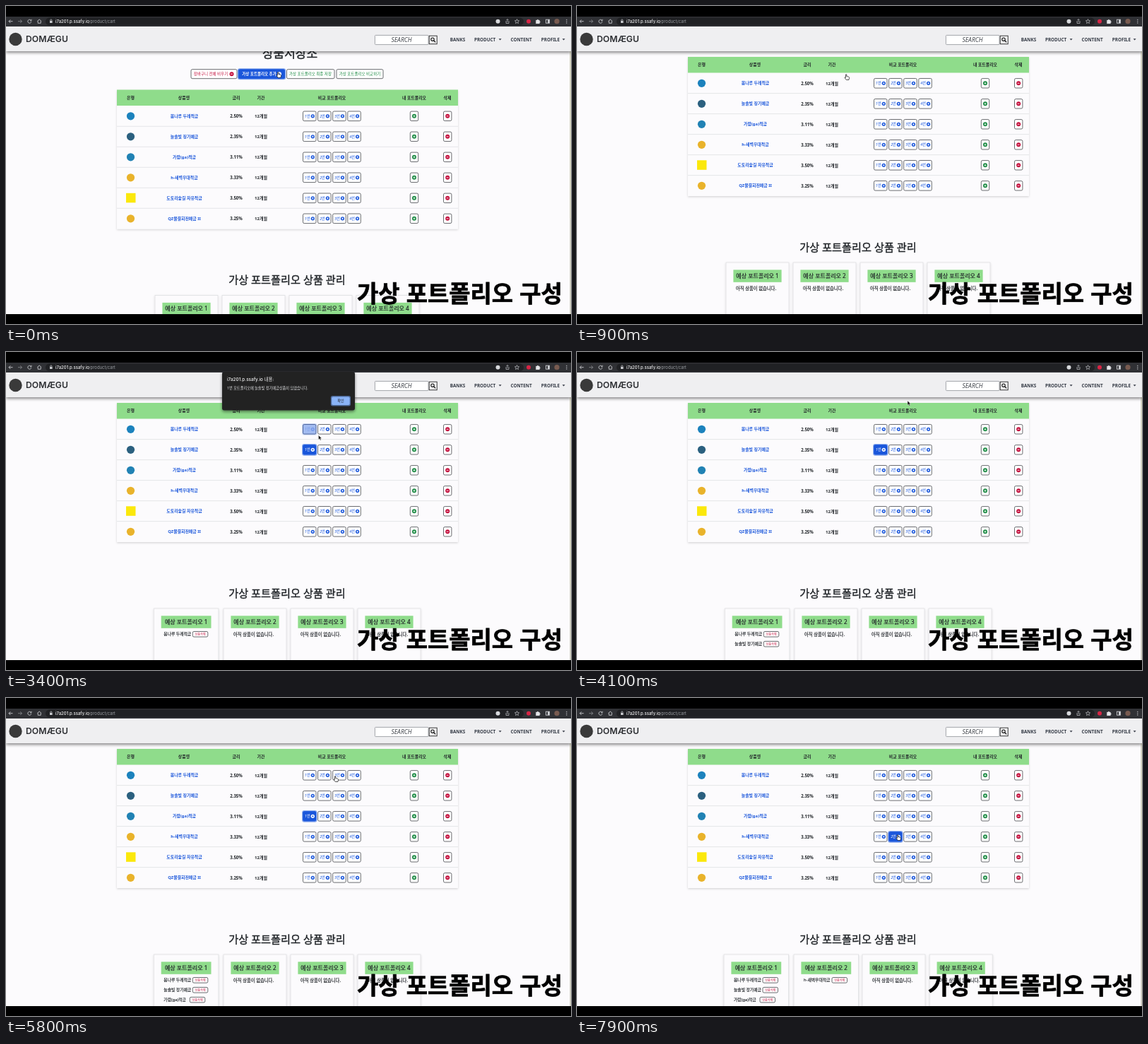
An HTML page for the animation above (8000 ms loop, 800 px wide and 450 px high).

```html
<!DOCTYPE html>
<html lang="ko">
<head>
<meta charset="utf-8">
<style>
html, body { margin: 0; width: 100%; height: 100%; overflow: hidden; background: #000; }
svg { display: block; width: 800px; height: 450px; }
text { font-family: "Noto Sans", "Noto Sans CJK KR", "Noto Sans CJK", sans-serif; white-space: pre; }
.ui { font-family: Inter, "Noto Sans CJK KR", "Noto Sans CJK", sans-serif; }
.caption { font-family: "Noto Sans CJK KR", "Noto Sans CJK", sans-serif; stroke: #000; stroke-width: .7px; }
</style>
</head>
<body>
<svg id="stage" viewBox="0 0 800 450"></svg>
<script>
const LOOP = 8000, SCROLL = 46.5;
const BLUE = '#1a56db', GREEN = '#1a8a42', RED = '#c4123f', MINT = '#8fdc8b', INK = '#212529', RING = '#8cabed';

const products = [
  { name: '봄나루 두레적금', rate: '2.50%', color: '#1c82bd' },
  { name: '늘솔빛 정기예금', rate: '2.35%', color: '#2b607f' },
  { name: '가람(ga)적금', rate: '3.11%', color: '#2182b4' },
  { name: 'h-새벽우대적금', rate: '3.33%', color: '#e9b32b' },
  { name: '도토리숲길 자유적금', rate: '3.50%', color: '#fbe80c', square: true },
  { name: 'QZ물결회전예금 II', rate: '3.25%', color: '#e9b32b' }
];

// Each press adds product `row` to portfolio `col`; the dialog stays until `ok`.
const presses = [
  { row: 0, col: 0, click: 1500, ok: 2200, gap: 41 },
  { row: 1, col: 0, click: 3050, ok: 3850, gap: 41 },
  { row: 2, col: 0, click: 4800, ok: 5500, gap: 37 },
  { row: 3, col: 1, click: 6850, ok: 7450, gap: 40 }
];

// time, x, y
const pointerPath = [
  [0, 385, 94], [300, 381, 97], [1000, 381, 97], [1400, 430, 110], [1600, 430, 110],
  [2100, 470, 69], [2250, 470, 69], [2400, 466, 69], [2500, 466, 69], [2950, 430, 139],
  [3200, 430, 139], [3750, 471, 69], [3900, 471, 69], [4100, 468, 69], [4200, 468, 69],
  [4650, 430, 168], [4950, 430, 168], [5400, 470, 69], [5550, 470, 69], [5800, 466, 111],
  [6450, 453, 197], [6880, 453, 197], [7100, 465, 133], [7350, 471, 69], [7500, 471, 69],
  [7880, 454, 194], [8000, 454, 194]
];

const clamp = v => Math.max(0, Math.min(1, v));
const ramp = (t, a, b) => clamp((t - a) / (b - a));
const smooth = v => v * v * (3 - 2 * v);
const rowY = row => 109.3 + row * 29;
const colX = col => 420.5 + col * 21.1;

const rect = (x, y, w, h, fill, extra = '') =>
  `<rect x="${x}" y="${y}" width="${w}" height="${h}" fill="${fill}" ${extra}/>`;
const circle = (x, y, r, fill, extra = '') =>
  `<circle cx="${x}" cy="${y}" r="${r}" fill="${fill}" ${extra}/>`;
const path = (d, stroke, width = 1, fill = 'none') =>
  `<path d="${d}" stroke="${stroke}" stroke-width="${width}" fill="${fill}"/>`;
// y is the visual middle of the line of text
const text = (s, x, y, size, fill = INK, weight = 700, anchor = 'middle', extra = '') =>
  `<text x="${x}" y="${y + size * .37}" font-size="${size}" fill="${fill}" font-weight="${weight}" text-anchor="${anchor}" ${extra}>${s}</text>`;
// A fine outline gives Hangul the medium weight between regular and bold.
const medium = (s, x, y, size, anchor) =>
  text(s, x, y, size, INK, 500, anchor, `stroke="${INK}" stroke-width="${size * .026}"`);
const outlined = (x, y, w, h, stroke = '#3a3d42', fill = '#fff') =>
  rect(x, y, w, h, fill, `rx="1.8" stroke="${stroke}" stroke-width=".75"`);
const sign = (x, y, fill, plus = true, mark = '#fff', r = 3) =>
  circle(x, y, r, fill) + path(`M${x - r / 2} ${y}h${r}` + (plus ? `M${x} ${y - r / 2}v${r}` : ''), mark, .8);

function portfolioButton(row, col, on) {
  const x = colX(col), y = rowY(row);
  return (on ? rect(x - 1.4, y - 8.4, 21.3, 16.8, RING, 'rx="3"') : '') +
    outlined(x, y - 6.8, 18.5, 13.6, on ? BLUE : undefined, on ? BLUE : '#fff') +
    text(col + 1 + '번', x + 6.4, y, 5.2, on ? '#fff' : BLUE, 500) +
    sign(x + 13.8, y, on ? '#fff' : BLUE, true, on ? BLUE : '#fff', 2.6);
}

function table() {
  const heads = [['은행', 176.5], ['상품명', 252], ['금리', 326], ['기간', 361],
    ['비교 포트폴리오', 461.5], ['내 포트폴리오', 578], ['삭제', 625]];
  let s = rect(157, 72, 483, 197, '#fcfbfd', 'filter="url(#soft)"') + rect(157, 72, 483, 22.5, MINT);
  s += heads.map(([label, x]) => text(label, x, 83, 5.9)).join('');
  products.forEach((p, row) => {
    const y = rowY(row);
    if (row) s += rect(157, y - 15, 483, .8, '#dfe0e3');
    s += p.square ? rect(170, y - 7, 13.5, 13.5, p.color) : circle(176.5, y, 5.6, p.color);
    s += text(p.name, 252.5, y, 5.9, BLUE) + text(p.rate, 326, y, 6.1) + text('12개월', 361, y, 6);
    for (let col = 0; col < 4; col++) s += portfolioButton(row, col, false);
    s += outlined(572.3, y - 6.7, 11.4, 13.4) + sign(578, y, GREEN);
    s += outlined(619.5, y - 6.7, 11.4, 13.4) + sign(625.2, y, RED, false);
  });
  return s;
}

function topButtons() {
  const y = 49.7;
  return medium('상품저장소', 402, 20, 17) +
    outlined(262, y - 6.5, 65, 13) + text('장바구니 전체 비우기', 290, y, 5.5, RED, 500) + sign(319.5, y, RED, false) +
    rect(327.8, y - 8, 68.4, 16, RING, 'rx="3"') + outlined(329.3, y - 6.5, 65.4, 13, BLUE, BLUE) +
    text('가상 포트폴리오 추가', 358.5, y, 5.5, '#fff', 600) + sign(387, y, '#fff', true, BLUE) +
    outlined(397.5, y - 6.5, 67.5, 13) + text('가상 포트폴리오 최종 저장', 431, y, 5.5, GREEN, 500) +
    outlined(468, y - 6.5, 66, 13) + text('가상 포트폴리오 비교하기', 501, y, 5.5, GREEN, 500);
}

function cards(count) {
  const starts = count === 0 ? [211, 306, 401, 496] : count < 4 ? [209.3, 308, 403, 498] : [208, 307, 404, 499.2];
  return starts.map((x, col) => {
    const items = presses.slice(0, count).filter(p => p.col === col);
    const w = items.length ? 91.6 : 89;
    let s = rect(x, 363, w, 130, '#fcfbfd', 'stroke="#dedfe2" stroke-width=".8" filter="url(#soft)"') +
      rect(x + 10.4, 373.3, w - 20.8, 17.5, MINT) +
      medium('예상 포트폴리오 ' + (col + 1), x + w / 2, 382, 8);
    if (!items.length) s += medium('아직 상품이 없습니다.', x + 14, 399.3, 6.3, 'start');
    items.forEach((p, i) => {
      const y = 399.3 + i * 13.9, bx = x + 14 + p.gap;
      s += medium(products[p.row].name, x + 14, y, 5.8, 'start') +
        outlined(bx, y - 3.8, 21.5, 7.6) + text('상품삭제', bx + 10.8, y, 4.1, RED, 500);
    });
    return s;
  }).join('');
}

function browserBar() {
  const g = '#c9cbcf';
  return rect(0, 15, 800, 14, '#303135') +
    rect(56, 16.6, 677, 10.6, '#202124', 'rx="5.3"') +
    path('M9.5 21.7h-5.5m2.3-2.3l-2.3 2.3l2.3 2.3', g, .9) +
    path('M17 21.7h5.5m-2.3-2.3l2.3 2.3l-2.3 2.3', '#85878c', .9) +
    path('M35.4 20.3a2.5 2.5 0 1 0 .4 2M36 18.8v2h-2', g, .9) +
    path('M44.3 21.6l2.9-2.6l2.9 2.6M45.2 21.3v3h4v-3', g, .9) +
    rect(62, 21, 3.6, 3, g) + path('M62.7 21v-1a1.1 1.1 0 0 1 2.2 0v1', g, .7) +
    text('i7a201.p.ssafy.io', 70, 21.6, 6, '#f1f1f2', 500, 'start', 'class="ui"') +
    text('/product/cart', 117.3, 21.6, 6, '#9a9da2', 400, 'start', 'class="ui"') +
    circle(696.5, 21.7, 3, '#d7d9dc') +
    path('M708 21v3.5h4v-3.5M710 23v-4.3m-1.5 1.3l1.5-1.5l1.5 1.5', g, .7) +
    path('M723.5 18.6l.9 2.1l2.2.2l-1.7 1.5l.5 2.2l-1.9-1.2l-1.9 1.2l.5-2.2l-1.7-1.5l2.2-.2z', g, .7) +
    circle(740, 21.7, 3, '#d92545') +
    path('M750.3 20h1.6a1 1 0 1 1 2 0h1.6v1.6a1 1 0 1 1 0 2v1.3h-5.2z', g, .2, '#e4e5e8') +
    rect(764.5, 19.2, 5, 5, 'none', `stroke="${g}" stroke-width=".9"`) + rect(767, 19.2, 2.5, 5, g) +
    circle(780, 21.7, 3.6, '#795b50') +
    [19.4, 21.7, 24].map(y => circle(793.8, y, .65, g)).join('');
}

function navbar() {
  const link = (s, x) => text(s, x, 47.3, 6.3, '#343a45', 600, 'start');
  const caret = x => `<path d="M${x} 46.2h4l-2 2.2z" fill="#343a45"/>`;
  return rect(0, 29, 800, 35, '#efeff1', 'filter="url(#drop)"') +
    circle(13.5, 47, 9.2, '#3a3a3a') +
    text('DOMÆGU', 28, 46.8, 12.2, '#2b2d31', 600, 'start', 'class="ui"') +
    rect(522.4, 41.4, 75.6, 13.2, '#fff', 'rx="1" stroke="#8f9297" stroke-width=".8"') +
    text('SEARCH', 560, 48, 8.5, '#45494f', 500, 'middle', 'font-style="italic"') +
    rect(599.2, 42.2, 11, 11.6, '#f6f6f7', 'stroke="#222" stroke-width=".9"') +
    circle(604, 47.2, 2.2, 'none', 'stroke="#111" stroke-width="1.1"') + path('M605.6 48.8l2.5 2.6', '#111', 1.3) +
    link('BANKS', 628.8) + link('PRODUCT', 663) + caret(697.6) +
    link('CONTENT', 714.6) + link('PROFILE', 757.8) + caret(787.6);
}

function dialog(p) {
  return rect(306, 28, 188, 54.5, '#202124', 'rx="3" filter="url(#drop)"') +
    text('i7a201.p.ssafy.io 내용:', 313, 39, 6.4, '#f1f1f2', 500, 'start', 'class="ui"') +
    text(`${p.col + 1}번 포트폴리오에 ${products[p.row].name}상품이 담겼습니다.`, 313, 51.2, 5.2, '#e6e7e9', 500, 'start') +
    rect(459.8, 62, 28.2, 14.4, '#4f6a98', 'rx="2.6"') + rect(461.2, 63.4, 25.4, 11.6, '#8ab4f8', 'rx="1.8"') +
    text('확인', 474, 69.2, 5.2, '#202124', 500);
}

const stage = document.getElementById('stage');
stage.innerHTML = `
  <defs>
    <filter id="soft" x="-10%" y="-10%" width="120%" height="125%"><feDropShadow dx="0" dy="1.2" stdDeviation="1.6" flood-opacity=".16"/></filter>
    <filter id="drop" x="-10%" y="-10%" width="120%" height="150%"><feDropShadow dx="0" dy="2" stdDeviation="2" flood-opacity=".48"/></filter>
    <clipPath id="view"><rect y="28" width="800" height="408"/></clipPath>
  </defs>
  <g clip-path="url(#view)">
    ${rect(0, 28, 800, 408, '#fcfbfd')}
    <g id="page">
      ${topButtons()}${table()}
      ${presses.map((p, i) => `<g id="press${i}">${portfolioButton(p.row, p.col, true)}</g>`).join('')}
      ${medium('가상 포트폴리오 상품 관리', 398, 341, 15.2)}
      <g id="cards"></g>
    </g>
    ${rect(798.3, 64, 1.7, 372, '#cfcec0')}
    <rect id="thumb" x="798.3" y="64" width="1.7" height="264" fill="#d9d8c6"/>
    ${navbar()}
  </g>
  ${browserBar()}
  <g id="dialog"></g>
  ${text('가상 포트폴리오 구성', 642.3, 406.5, 32.9, '#000', 900, 'middle', 'class="caption"')}
  <g id="pointer">
    <path id="arrow" d="M0 0v6.2l1.5-1.3l1.1 2.4l1.1-.5l-1.1-2.3h2z" fill="#111" stroke="#fff" stroke-width=".4"/>
    <path id="hand" d="M-.6 0q.8-.9 1.4 0v2.5l3 .7q.9.4.7 1.6l-.6 2.7h-3.6l-2.3-3q0-.9.8-.7l.7.6z" fill="#fff" stroke="#111" stroke-width=".7"/>
  </g>`;

const el = id => document.getElementById(id);
const shown = {};
function fill(id, key, draw) {
  if (shown[id] === key) return;
  shown[id] = key;
  el(id).innerHTML = draw();
}

// The old button's fade pauses midway while the next dialog blocks the page.
function pressLevel(i, t) {
  const p = presses[i], next = presses[i + 1];
  const level = ramp(t, p.click - 200, p.click - 50);
  if (!next || t < next.click) return level;
  return 1 - Math.min(.6, (t - next.click) / 150) - .4 * ramp(t, next.ok, next.ok + 100);
}

function pointerAt(t) {
  const i = pointerPath.findIndex(k => k[0] > t);
  const [t0, x0, y0] = pointerPath[i - 1], [t1, x1, y1] = pointerPath[i];
  const k = smooth(ramp(t, t0, t1));
  return [x0 + (x1 - x0) * k, y0 + (y1 - y0) * k];
}

function overButton(x, y) {
  const dx = (x - colX(0)) / 21.1, dy = (y - rowY(0) + 7) / 29;
  return dx >= 0 && dx < 4 && dx % 1 < .9 && dy >= 0 && dy < 6 && dy % 1 < .5;
}

function render(t) {
  const scroll = SCROLL * (1 - smooth(ramp(t, 100, 650)));
  el('page').setAttribute('transform', `translate(0 ${scroll})`);
  el('thumb').setAttribute('height', 264 - scroll * .6);
  presses.forEach((p, i) => el('press' + i).setAttribute('opacity', pressLevel(i, t)));

  const count = presses.filter(p => t >= p.ok + 30).length;
  fill('cards', count, () => cards(count));
  const open = presses.findIndex(p => t >= p.click + 80 && t < p.ok);
  fill('dialog', open, () => open < 0 ? '' : dialog(presses[open]));

  const [x, y] = pointerAt(t);
  const hand = t < 1050 || (open < 0 && overButton(x, y));
  el('pointer').setAttribute('transform', `translate(${x} ${y})`);
  el('hand').setAttribute('visibility', hand ? 'visible' : 'hidden');
  el('arrow').setAttribute('visibility', hand ? 'hidden' : 'visible');
}

const start = performance.now();
function tick() {
  render((performance.now() - start) % LOOP);
  requestAnimationFrame(tick);
}
tick();
</script>
</body>
</html>
```
